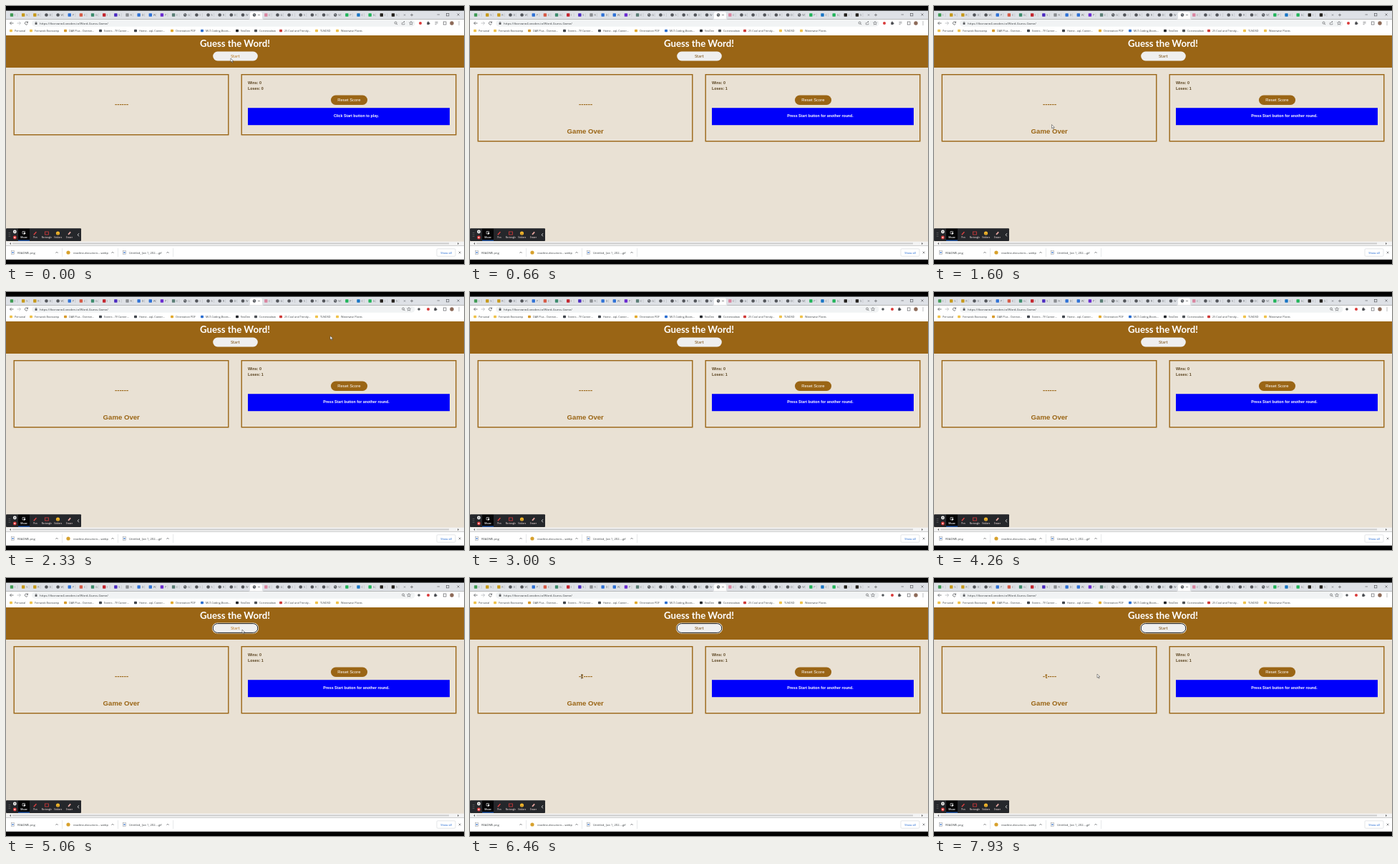
An HTML page for the animation above (8000 ms loop, 640 by 360 pixels).

```html
<!DOCTYPE html>
<html lang="en">
<head>
<meta charset="utf-8">
<title>Guess the Word</title>
<style>
  html, body { margin: 0; width: 100%; height: 100%; overflow: hidden; background: #000; }
  svg { display: block; width: 100vw; height: 100vh; }
  text { font-family: "Open Sans", sans-serif; white-space: pre; }
  .page { font-family: "Liberation Sans", Arial, sans-serif; font-weight: 700; }
  .head { font-family: Lato, sans-serif; }
</style>
</head>
<body>
<svg id="stage" viewBox="0 0 640 360"></svg>
<script>
const LOOP = 8000;
const BROWN = '#9a6515', CREAM = '#e9e1d4', INK = '#4a4c50';
const stage = document.getElementById('stage');

const rect = (x, y, w, h, fill, more = '') =>
  `<rect x="${x}" y="${y}" width="${w}" height="${h}" fill="${fill}" ${more}/>`;
const dot = (x, y, r, fill, more = '') =>
  `<circle cx="${x}" cy="${y}" r="${r}" fill="${fill}" ${more}/>`;
const line = (d, color = INK, width = .7, more = '') =>
  `<path d="${d}" fill="none" stroke="${color}" stroke-width="${width}" ${more}/>`;
const text = (x, y, size, fill, str, more = '') =>
  `<text x="${x}" y="${y}" font-size="${size}" fill="${fill}" ${more}>${str}</text>`;
const MID = 'text-anchor="middle"', PAGE = 'class="page"', HEAD = 'class="head"';
const cross = (x, y, r, color, w) =>
  line(`M${x - r} ${y - r}l${2 * r} ${2 * r}m0 ${-2 * r}l${-2 * r} ${2 * r}`, color, w);
const globe = (x, y) => dot(x, y, 2.2, '#4d5156') +
  line(`M${x - 1.4} ${y - .6}h1.6l.8 1.4`, '#dfe2e6', .7);

function tabStrip() {
  // One letter per favicon: k dark round mark, g globe, others are coloured squares
  const kinds = 'nyykkbrtcpabbvdgkkkkkgmkkkkkgelesu';
  const colors = { n: '#3f9b54', y: '#c79a1c', b: '#2f72d6', r: '#d65a45', t: '#3c8c6d', c: '#c3262f',
    p: '#4b2ac0', a: '#8a8d91', v: '#6b2bd0', d: '#5b7f76', m: '#d985a0', e: '#22b45a',
    l: '#1976c5', s: '#25221e', u: '#25221e' };
  let out = rect(0, 6.5, 640, 12, '#dee1e6') +
    `<path d="M339 18.5q2 0 2-2v-6q0-2 2-2h13q2 0 2 2v6q0 2 2 2z" fill="#fff"/>`;
  [...kinds].forEach((k, i) => {
    const x = 8 + i * 16.15;
    if (i === 21) {
      out += globe(347, 12.5) + cross(353.5, 12.5, 1.1, INK, .6);
      return;
    }
    out += k === 'k' ? dot(x, 12.5, 2.3, '#53565b') : k === 'g' ? globe(x, 12.5)
      : rect(x - 2.2, 10.3, 4.4, 4.4, colors[k], 'rx=".6"');
    out += text(x + 4, 14, 3.8, '#5f6368', 'ISRDWPCG'[i % 8]);
    if (i !== 20) out += line(`M${x + 8} 10v5`, '#a4a8ae', .35);
  });
  return out + cross(557, 12.5, 1, INK, .5) + line('M565 12.5h4m-2-2v4', INK, .6) +
    line('M602.5 12h3.5', INK, .6) + rect(615.5, 10.5, 3.4, 3.4, 'none', `stroke="${INK}" stroke-width=".6"`) +
    cross(632, 12, 1.5, INK, .6);
}

const lens = x => dot(x, 23.5, 1.5, 'none', `stroke="${INK}" stroke-width=".6"`) + line(`M${x + 1} 24.6l1.4 1.5`);
const share = x => line(`M${x - 1.8} 23v2.8h3.6v-1.6M${x - .8} 24q.4-2 2.8-2m-1-1l1 1-1 1`, INK, .5);
const star = x => `<path d="M${x} 21.4l.7 1.6 1.8.2-1.3 1.2.4 1.8-1.6-.9-1.6.9.4-1.8-1.3-1.2 1.8-.2z" fill="none" stroke="${INK}" stroke-width=".5"/>`;
const puzzle = x => rect(x - 1.7, 22.6, 3.3, 3.3, INK, 'rx=".4"') + dot(x, 22.3, .8, INK) + dot(x + 1.8, 24.2, .8, INK);

function addressBar() {
  return rect(0, 18.5, 640, 22.5, '#fff') +
    rect(36, 19.3, 535.5, 9.4, '#f1f3f4', 'rx="4.7"') +
    line('M10.5 24H5.5m2.2-2.2L5.5 24l2.2 2.2') +
    line('M15.5 24h5m-2.2-2.2l2.2 2.2-2.2 2.2', '#a9acb0') +
    line('M30.3 23a2.1 2.1 0 1 0 0 2M30.5 21.5v1.8h-1.8') +
    rect(40.6, 23.4, 2.8, 2.4, INK) + line('M41.2 23.5v-1q.8-1.3 1.6 0v1', INK, .5) +
    text(47, 25.6, 4.3, '#3c4043', 'https://tkorvane4.vexden.io/Word-Guess-Game/') +
    `<g id="zoomed">${lens(544.5) + share(555) + star(566)}
      ${dot(579, 24, 2, '#d93a3a') + puzzle(590)}${line('M599.5 22.3h4m-4 1.7h4m-4 1.7h2', INK, .5)}</g>` +
    `<g id="normal">${lens(555) + star(563)}
      ${dot(577, 24, 1.8, '#55585c') + dot(590, 24, 2, '#d93a3a') + puzzle(600)}</g>` +
    rect(611.2, 22, 3.8, 4, 'none', `stroke="${INK}" stroke-width=".6"`) +
    dot(623, 24, 2.7, '#8d6a58') + [22, 24, 26].map(y => dot(633, y, .5, INK)).join('');
}

function bookmarks() {
  const items = [[12, 'Personal', '#f0c24b'], [40, 'Fernwick Bootcamp', '#f0c24b'],
    [88, 'DAR Plus - Overvie...', '#d79a2b'], [137, 'Events - 7V Career...', '#41464d'],
    [186, 'Home - oqL Career...', '#41464d'], [237, 'Orientation PDF', '#e3aa2e'],
    [279, 'MLT-Coding-Boots...', '#2c6fd1'], [328, 'VexDen', '#25282c'],
    [354, 'Coinmeadow', '#4d5156'], [389, '25 Cool and Trendy...', '#cf3b38'],
    [439, 'TLNOSD', '#f0c24b'], [468, 'Waterwise Plants', '#f0c24b']];
  return items.map(([x, label, color]) =>
    rect(x - 7, 32.8, 4, 3.4, color, 'rx=".7"') + text(x, 35.9, 3.75, '#3c4043', label)).join('');
}

function page() {
  const frame = x => rect(x, 95.7, 299.6, 84, 'none', `class="panel" stroke="${BROWN}" stroke-width="1.4"`);
  return rect(0, 41, 640, 288, CREAM) + rect(0, 41, 640, 45, BROWN) +
    text(320, 57.2, 13.2, '#fff', 'Guess the Word!', `${MID} ${HEAD} font-weight="700"`) +
    rect(288, 62.6, 65, 14.8, '#fff', 'id="halo" rx="7.4"') +
    rect(289.2, 63.6, 62.6, 12.8, '#efefef', 'id="start" rx="6.4" stroke-width="1"') +
    text(320.3, 72.2, 6, BROWN, 'Start', `id="startLabel" ${MID} ${HEAD}`) +
    frame(11.2) + frame(329.2) +
    text(152, 140.2, 9.6, BROWN, '------', `id="word" ${PAGE}`) +
    text(161.2, 178.2, 9.6, BROWN, 'Game Over', `id="over" ${PAGE} ${MID}`) +
    text(338, 108.6, 5.4, '#5b4420', 'Wins: 0', PAGE) +
    text(338, 116.7, 5.4, '#5b4420', '', `id="loses" ${PAGE}`) +
    rect(454, 124.6, 51, 13.4, BROWN, 'rx="6.7"') +
    text(479.4, 133, 5.85, '#fff', 'Reset Score', `${PAGE} ${MID} style="font-weight:400"`) +
    rect(338, 142.2, 282, 24, '#0000fa') +
    text(489.5, 154.8, 5.25, '#fff', '', `id="message" ${PAGE} ${MID}`);
}

function recorder() {
  const labels = ['Mouse', 'Pen', 'Rectangle', 'Stickers', 'Eraser'];
  return rect(0, 310.3, 105, 17.8, '#25272b', 'rx="1"') +
    rect(17, 310.8, 16, 16.8, '#050506') + rect(17, 326.6, 16, 1, '#2d7bf0') +
    [316.5, 319, 321.5].map(y => dot(4, y, .45, '#999') + dot(5.6, y, .45, '#999')).join('') +
    dot(12.3, 315, 2.4, '#f4f4f4') + line('M11.2 315h2.2m-1.1-1.1v2.2', '#333', .5) +
    dot(12.3, 323, 2.4, '#e33a3a') + rect(11.5, 322.2, 1.6, 1.6, '#fff') +
    line('M23 314.5h3.4v3.4H23z', '#eee', .6) + `<path d="M24.6 315.6l3.2 2-1.5.4-.6 1.4z" fill="#fff"/>` +
    line('M38.8 319.3l3.6-4', '#e04343', 1.3) +
    rect(54.5, 315, 5, 4, 'none', 'stroke="#d83a3a" stroke-width=".8"') +
    dot(72.5, 317, 2.6, '#f2b62c') + line('M71.3 317.6q1.2 1.2 2.4 0', '#6b4510', .5) +
    line('M87 318.8l3.2-3.4', '#e7a6a0', 1.8) +
    labels.map((s, i) => text(25 + i * 15.9, 324.3, 3, i ? '#d9c8c8' : '#fff', s, MID + ' font-weight="600"')).join('') +
    line('M101.8 317.3l-1.5 2 1.5 2', '#fff', .8);
}

function shelf() {
  const files = [[16, 'README.png', 71], [94, 'readme-documen....webp', 149], [172, 'Untitled_ Jan 1, 202....gif', 226]];
  return rect(0, 328.7, 640, 5.6, '#f3f3f3') + rect(9, 330.4, 610, 2, '#cdcdcd') +
    `<path d="M7 330v3l-2-1.5zM631 330v3l2-1.5z" fill="#666"/>` +
    rect(0, 334.3, 640, 19.5, '#fff') + line('M0 334.4h640', '#d5d7da', .4) +
    files.map(([x, name, up], i) =>
      (i === 1 ? dot(87, 344, 2.6, '#d7a12d')
        : rect(x - 8.5, 341.3, 4, 5.2, '#fff', 'stroke="#8b9096" stroke-width=".5"') + rect(x - 7.5, 343.2, 2, 1.7, '#3f7ad0')) +
      text(x, 345.6, 4.1, '#3c4043', name) + line(`M${up - 1.5} 344.8l1.5-1.6 1.5 1.6`) +
      line(`M${up + 7.5} 338v12`, '#cfd2d6', .5)).join('') +
    rect(602, 338.8, 26, 10.4, '#fff', 'rx="1.3" stroke="#d0d3d8" stroke-width=".6"') +
    text(615, 345.5, 4, '#1a65d2', 'Show all', MID) + cross(634, 344, 1.4, INK, .6);
}

stage.innerHTML = rect(0, 0, 640, 360, '#000') + tabStrip() + addressBar() + bookmarks() + page() + recorder() + shelf() +
  `<g id="pointer"><path id="arrow" d="M0 0v5.2l1.3-1.1.9 2 .9-.4-.9-1.9h1.7z" fill="#fff" stroke="#333" stroke-width=".5"/>
   ${line('M-1 -2.5h2m-1 0v5m-1 0h2', '#333', .6, 'id="beam"')}</g>`;

const get = id => document.getElementById(id);
const show = (id, on) => get(id).setAttribute('visibility', on ? 'visible' : 'hidden');
const set = (id, name, value) => get(id).setAttribute(name, value);

// Pointer moves: start, end, from, to
const moves = [
  [0, 330, 314, 73, 314, 73], [930, 1600, 314, 73, 164.5, 165.5], [1600, 1800, 164.5, 165.5, 164.5, 165.5],
  [1800, 2600, 164.5, 165.5, 556, 24], [4660, 4930, 345, 98, 330, 72], [4930, 6130, 330, 72, 330, 72],
  [6130, 6400, 330, 72, 156, 137.5], [6400, 7060, 156, 137.5, 156, 137.5], [7060, 7860, 156, 137.5, 228, 134],
  [7860, LOOP, 228, 134, 228, 134]];

function draw(t) {
  const ended = t >= 330, focused = t >= 4930, zoomed = t < 2200;
  const move = moves.find(m => t >= m[0] && t < m[1]);
  let hover = false;
  show('pointer', move);
  if (move) {
    const [a, b, x0, y0, x1, y1] = move;
    const p = (t - a) / (b - a), k = p * p * (3 - 2 * p);
    const x = x0 + (x1 - x0) * k, y = y0 + (y1 - y0) * k;
    hover = x > 289 && x < 352 && y > 63 && y < 77;
    set('pointer', 'transform', `translate(${x} ${y})`);
    const beam = x > 151 && x < 172 && y > 131 && y < 143;
    set('arrow', 'display', beam ? 'none' : 'inline');
    set('beam', 'display', beam ? 'inline' : 'none');
  }
  document.querySelectorAll('.panel').forEach(p => p.setAttribute('height', ended ? 93 : 84));
  show('over', ended);
  show('halo', focused);
  show('zoomed', zoomed);
  show('normal', !zoomed);
  set('start', 'stroke', focused ? '#17191c' : 'none');
  set('startLabel', 'fill', hover ? '#bd7a22' : '#7b4f12');
  get('word').textContent = t >= 6260 ? '-t----' : '------';
  get('loses').textContent = 'Loses: ' + (ended ? 1 : 0);
  get('message').textContent = ended ? 'Press Start button for another round.' : 'Click Start button to play.';
}

const begin = performance.now();
function tick() {
  draw((performance.now() - begin) % LOOP);
  requestAnimationFrame(tick);
}
tick();
</script>
</body>
</html>
```
